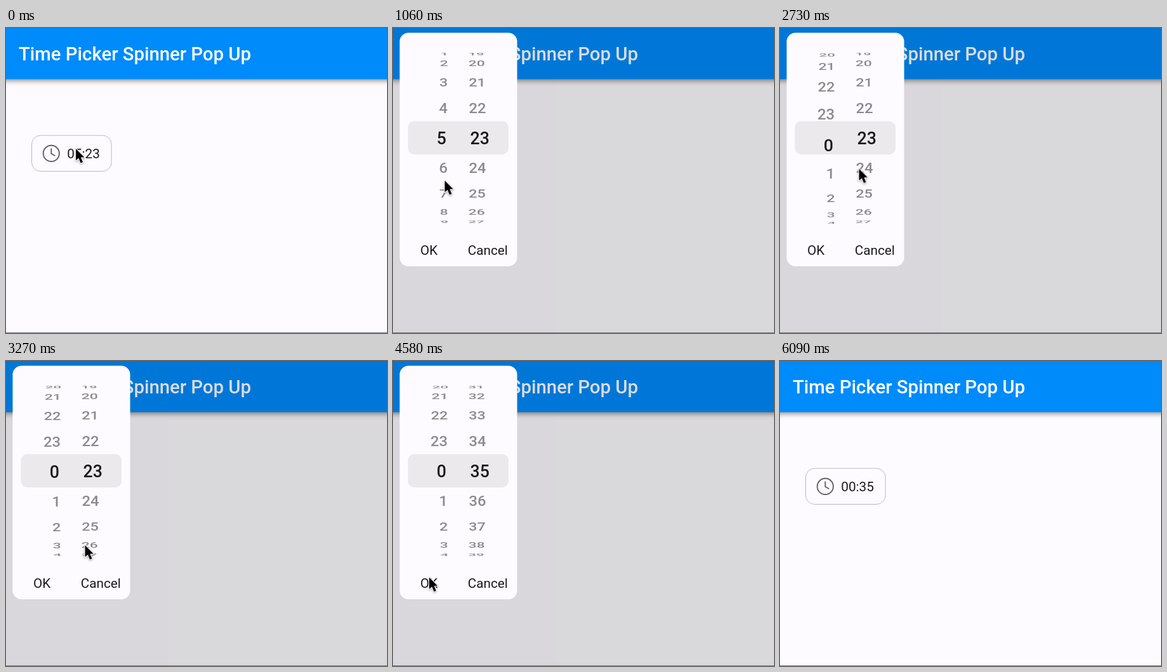
An HTML page for the animation above (6.36 s loop, 600 by 480 pixels).

```html
<!DOCTYPE html>
<html lang="en">
<head>
<meta charset="utf-8">
<title>Time picker</title>
<style>
  html, body { margin: 0; width: 100%; height: 100%; overflow: hidden; background: #fdfbff; }
  svg { display: block; width: 600px; height: 480px; font-family: Roboto, sans-serif; fill: #1b1a1e; }
  .bar { fill: #008bfb; filter: drop-shadow(0 2px 4px rgba(0, 0, 0, .5)); }
  .title { font-size: 29.3px; font-weight: 500; fill: #fff; }
  .label { font-size: 20.7px; }
  .field { fill: none; stroke: #bbb9bd; }
  .clock { fill: none; stroke: #626165; stroke-width: 1.9; }
  .wheel { font-size: 23.9px; font-weight: 500; }
  .far { fill-opacity: .5; }
  .popup { animation: popup 6360ms linear infinite; }
  .cursor { animation: cursor 6360ms ease-in-out infinite; }
  .arrow { fill: #000; stroke: #fff; stroke-width: 2.4; paint-order: stroke; stroke-linejoin: round;
    filter: drop-shadow(0 1.5px 1.5px rgba(0, 0, 0, .35)); }

  @keyframes popup {
    0%, 1.4% { opacity: 0; }
    7.2%, 75.2% { opacity: 1; }
    81%, 100% { opacity: 0; }
  }
  @keyframes cursor {
    0%, 13.8% { transform: translate(110px, 190px); visibility: visible; }
    16.67% { transform: translate(81.5px, 240px); }
    23.3% { transform: translate(80px, 264px); }
    25.47% { transform: translate(85px, 319px); animation-timing-function: cubic-bezier(.33, 0, .67, .33); }
    28.3%, 36.2% { transform: translate(95.5px, 107px); }
    42.9% { transform: translate(124.5px, 221.5px); }
    46.4%, 51.89% { transform: translate(124.5px, 290px); animation-timing-function: cubic-bezier(.33, 0, .67, .33); }
    54.72%, 64.8% { transform: translate(125.5px, 187.5px); }
    70%, 87.2% { transform: translate(57px, 340.5px); visibility: visible; }
    87.3%, 100% { transform: translate(57px, 340.5px); visibility: hidden; }
  }
</style>
</head>
<body>
<svg viewBox="0 0 600 480">
  <defs>
    <clipPath id="outside"><path d="M11 37h184v110H11zM11 199h184v110H11z"/></clipPath>
    <clipPath id="inside"><rect x="11" y="147" width="184" height="52"/></clipPath>
  </defs>

  <rect width="600" height="480" fill="#fdfbff"/>
  <rect class="bar" x="-20" y="-20" width="640" height="100.5"/>
  <text class="title" x="20" y="51">Time Picker Spinner Pop Up</text>

  <rect class="field" x="40.5" y="169" width="125.5" height="56.5" rx="14"/>
  <g class="clock">
    <circle cx="71.3" cy="197.4" r="12.6"/>
    <path d="M71.3 189.5v8.2l6 3.6"/>
  </g>
  <text class="label" id="value" x="96.3" y="205.3">05:23</text>

  <g class="popup">
    <rect width="600" height="480" fill="#000" fill-opacity=".14"/>
    <rect x="10.5" y="7.5" width="185" height="367.5" rx="14" fill="#fdfbff"/>
    <rect x="23.5" y="146.5" width="158.5" height="52.5" rx="10" fill="#ebe9ec"/>
    <g class="wheel far" clip-path="url(#outside)"><g id="far"></g></g>
    <g class="wheel" clip-path="url(#inside)"><g id="near"></g></g>
    <text class="label" x="43" y="357.3">OK</text>
    <text class="label" x="117.8" y="357.3">Cancel</text>
  </g>

  <rect y="479" width="600" height="1" fill="#77767a"/>
  <g class="cursor">
    <path class="arrow" d="M0 0V18.6L4.3 14.7L7.6 22.4L11 20.9L7.8 13.5H13.4Z"/>
  </g>
</svg>
<script>
  const LOOP = 6360, ROWS = 11;
  const CX = 103, CY = 173;            // vanishing point of both wheels
  const RADIUS = 146, STEP = 0.33, DEPTH = 0.096, ZOOM = 1.12;
  const start = performance.now();
  const value = document.getElementById('value');

  const decay = (x, tau) => Math.exp(-x / tau);

  // Drag with a quadratic start, then a fling whose remaining distance dies away.
  function spin(t, from, dragged, to, begin, release, rest) {
    if (t < begin) return from;
    if (t < release) return from + (dragged - from) * ((t - begin) / (release - begin)) ** 2;
    return to - rest(t - release);
  }

  const hours = t => spin(t, 5, 9.4, 24, 1620, 1800,
    x => 7.73 * decay(x, 258) + 6.87 * decay(x, 40));
  const minutes = t => spin(t, 23, 25.1, 35, 3300, 3480, x => 9.9 * decay(x, 94.4));

  function makeWheel(layer, zoom, x, anchor, size, position) {
    const texts = Array.from({ length: ROWS }, () => {
      const text = document.createElementNS('http://www.w3.org/2000/svg', 'text');
      text.setAttribute('x', x);
      text.setAttribute('y', 8.5);
      text.setAttribute('text-anchor', anchor);
      return document.getElementById(layer).appendChild(text);
    });
    return t => {
      const pos = position(t), middle = Math.round(pos);
      texts.forEach((text, i) => {
        const n = middle + i - (ROWS - 1) / 2;
        const angle = (n - pos) * STEP, cos = Math.cos(angle);
        const scale = zoom / (1 + DEPTH * (1 - cos));
        const y = CY + RADIUS * Math.sin(angle) * scale;
        text.textContent = (n + size) % size;
        text.setAttribute('visibility', cos > 0 ? 'inherit' : 'hidden');
        text.setAttribute('transform',
          `translate(${CX} ${y}) scale(${scale} ${scale * Math.max(cos, 0.001)})`);
      });
    };
  }

  const wheels = [['far', 1], ['near', ZOOM]].flatMap(([layer, zoom]) => [
    makeWheel(layer, zoom, -17, 'end', 24, hours),
    makeWheel(layer, zoom, 16.5, 'start', 60, minutes)
  ]);

  function draw() {
    const t = Math.max(0, performance.now() - start) % LOOP;
    wheels.forEach(wheel => wheel(t));
    value.textContent = t < 4780 ? '05:23' : '00:35';
    requestAnimationFrame(draw);
  }
  draw();
</script>
</body>
</html>
```
